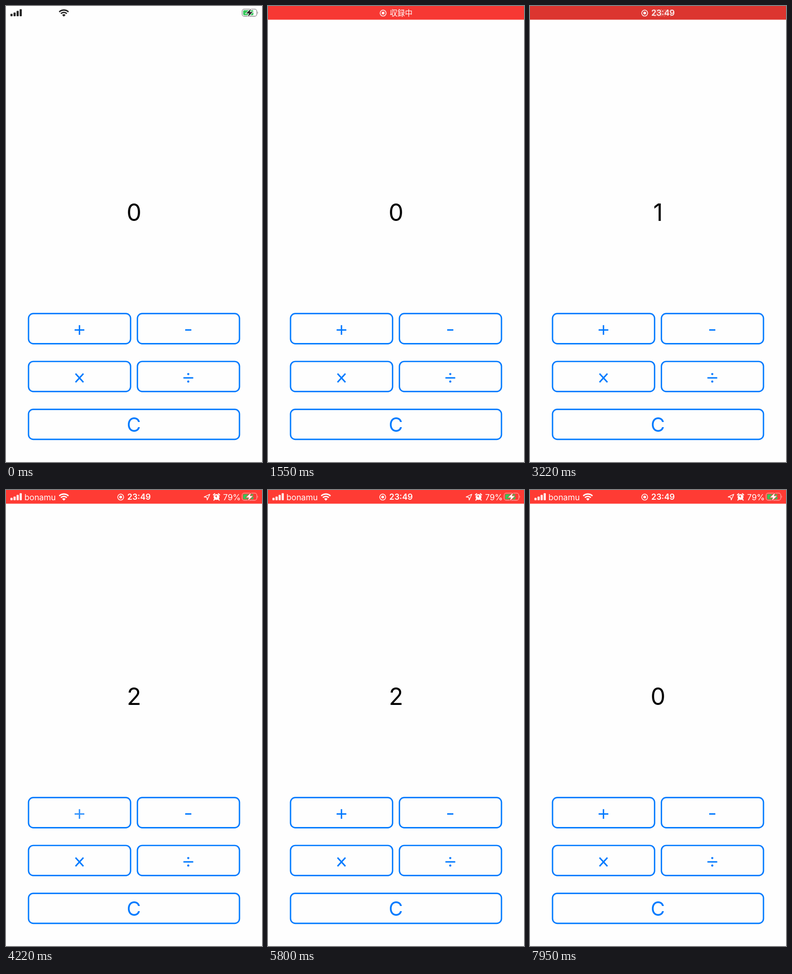
An HTML page for the animation above (8000 ms loop, 500 by 889 pixels).

```html
<!DOCTYPE html>
<html lang="ja">
<head>
<meta charset="utf-8">
<title>Counter</title>
<style>
  html, body { margin: 0; width: 100%; height: 100%; overflow: hidden; background: #fefefe; }
  svg { display: block; width: 100%; height: 100%; }
  text { font-family: Inter, "Noto Sans", sans-serif; }
  .small { font-size: 16px; fill: currentColor; }
  .jp { font-family: "Noto Sans CJK JP", "Noto Sans CJK", sans-serif; font-size: 14.7px; fill: #fff; }
  .digit { font-size: 46px; text-anchor: middle; }
  .box { fill: none; stroke: #007aff; stroke-width: 2.67; }
  .sign { fill: none; stroke: #007aff; stroke-width: 2.8; }
  .blue { fill: #007aff; }
  .line { fill: none; stroke: currentColor; }
  .solid { fill: currentColor; }
</style>
</head>
<body>
<svg viewBox="0 0 500 889" preserveAspectRatio="none">
  <rect width="500" height="889" fill="#fefefe"/>
  <rect id="bar" width="500" height="26.67" fill="#ff3b34"/>

  <g id="edges" color="#fff">
    <g class="solid">
      <rect x="8.7" y="15.2" width="4.1" height="4.8" rx="1"/>
      <rect x="14.7" y="12.7" width="4.1" height="7.3" rx="1"/>
      <rect x="20.7" y="9.6" width="4.1" height="10.4" rx="1"/>
      <rect x="26.7" y="6.2" width="4.1" height="13.8" rx="1"/>
      <path d="M113 20.7 L109.7 17.4 A4.7 4.7 0 0 1 116.3 17.4 Z"/>
    </g>
    <g class="line" stroke-width="2.7">
      <path d="M104 11.6 A12.9 12.9 0 0 1 122 11.6"/>
      <path d="M107.2 14.9 A8.2 8.2 0 0 1 118.8 14.9"/>
    </g>
    <g id="battery">
      <rect class="line" x="461.2" y="6.2" width="28.6" height="13.8" rx="4" stroke-width="1.3" opacity=".5"/>
      <path class="solid" d="M491.2 10.8 Q493.4 13.1 491.2 15.4 Z" opacity=".5"/>
      <rect x="463.2" y="8.2" width="20" height="9.8" rx="2" fill="#34c759"/>
      <path id="bolt" class="solid" d="M478.5 5.2 L469 14.4 H474.8 L472.3 21.2 L482 11.8 H476.2 Z"
        stroke="#ff3b34" stroke-width="2" paint-order="stroke"/>
    </g>
    <g id="details" color="#fff">
      <text class="small" x="36" y="19.5">bonamu</text>
      <path class="line" d="M398 8.4 L387 13.5 L392.2 14.4 L393 19.5 Z" stroke-width="1.3" stroke-linejoin="round"/>
      <circle class="solid" cx="411.2" cy="13.6" r="5.7"/>
      <path class="line" d="M405 9.4 L407.6 7.2 M417.4 9.4 L414.8 7.2 M407.5 18 L406 19.7 M414.9 18 L416.4 19.7"
        stroke-width="2" stroke-linecap="round"/>
      <path d="M408.2 10.8 L411.2 13.8 V10 M411.2 13.8 H411.3" fill="none" stroke="#ff3b34" stroke-width="1.2"/>
      <text class="small" x="424" y="19.5">79%</text>
    </g>
  </g>

  <g id="center" color="#fff">
    <g id="record">
      <circle class="line" cx="224" cy="13.8" r="5.8" stroke-width="1.4"/>
      <circle class="solid" cx="224" cy="13.8" r="2.7"/>
    </g>
    <text id="clock" class="small" x="236.7" y="19.4" font-weight="600">23:49</text>
    <text id="notice" class="jp" x="238" y="19.2">収録中</text>
  </g>

  <text id="zero" class="digit" x="250" y="418.6">0</text>
  <text id="one" class="digit" x="250" y="418.6">1</text>
  <text id="two" class="digit" x="250" y="418.6">2</text>

  <g class="box">
    <rect x="44" y="599.7" width="199.3" height="58.6" rx="9.3"/>
    <rect x="256.7" y="599.7" width="199.3" height="58.6" rx="9.3"/>
    <rect x="44" y="693" width="199.3" height="58.6" rx="9.3"/>
    <rect x="256.7" y="693" width="199.3" height="58.6" rx="9.3"/>
    <rect x="44" y="786.3" width="412" height="58.6" rx="9.3"/>
  </g>
  <path id="plus" class="sign" role="img" aria-label="+" d="M134 631.7 H153 M143.5 622.3 V641.1"/>
  <path id="minus" class="sign" role="img" aria-label="-" d="M350 631.6 H362"/>
  <path class="sign" role="img" aria-label="×" d="M135.8 716.7 L151.2 733.5 M151.2 716.7 L135.8 733.5"/>
  <g role="img" aria-label="÷">
    <path class="sign" d="M346.5 725 H365.7"/>
    <circle class="blue" cx="356" cy="717.6" r="2.1"/>
    <circle class="blue" cx="356" cy="732.2" r="2.1"/>
  </g>
  <text class="blue" x="249.7" y="829.6" font-size="38" text-anchor="middle">C</text>
</svg>
<script>
const LOOP = 8000;

// steps: [ms, value] pairs; the first and last values are held to the loop's ends
function play(id, prop, steps, easing = "linear") {
  const all = [[0, steps[0][1]], ...steps, [LOOP, steps.at(-1)[1]]];
  const frames = all.map(([ms, value]) => ({ offset: ms / LOOP, [prop]: value, easing }));
  document.getElementById(id).animate(frames, { duration: LOOP, iterations: Infinity });
}

const hold = (id, steps) => play(id, "opacity", steps, "step-end");
const taps = (id, times) => play(id, "opacity", times.flatMap(t =>
  [[t - 130, 1], [t - 90, .2], [t, .2], [t + 300, 1]]));

// Status bar
play("bar", "opacity", [[50, 0], [250, 1]]);
play("bar", "fill", [
  [150, "#ff3b34"], [500, "#e8372f"], [800, "#da342d"], [1550, "#f73833"],
  [1850, "#ff3b34"], [2900, "#d8332c"], [3220, "#dc352f"], [4050, "#ff3b34"]
], "ease-in-out");
play("edges", "color", [[50, "#222"], [250, "#fff"]]);
play("bolt", "stroke", [[50, "#fefefe"], [250, "#f03932"]]);
play("details", "opacity", [[50, 0], [250, 1]]);
play("center", "opacity", [[50, 0], [250, 1]]);
play("edges", "opacity", [[900, 1], [1100, 0], [3280, 0], [3500, 1]]);
play("clock", "opacity", [[1000, 1], [1250, 0], [3020, 0], [3240, 1]]);
play("notice", "opacity", [[1000, 0], [1250, 1], [3040, 1], [3290, 0]]);
play("record", "transform", [
  [1000, "translateX(0px)"], [1250, "translateX(.8px)"],
  [3020, "translateX(.8px)"], [3220, "translateX(0px)"]
]);

// Counter
hold("zero", [[0, 1], [2850, 0], [7300, 1]]);
hold("one", [[0, 0], [2850, 1], [4000, 0], [6300, 1], [7300, 0]]);
hold("two", [[0, 0], [4000, 1], [6300, 0]]);
taps("plus", [2850, 4000]);
taps("minus", [6300, 7300]);
</script>
</body>
</html>
```
